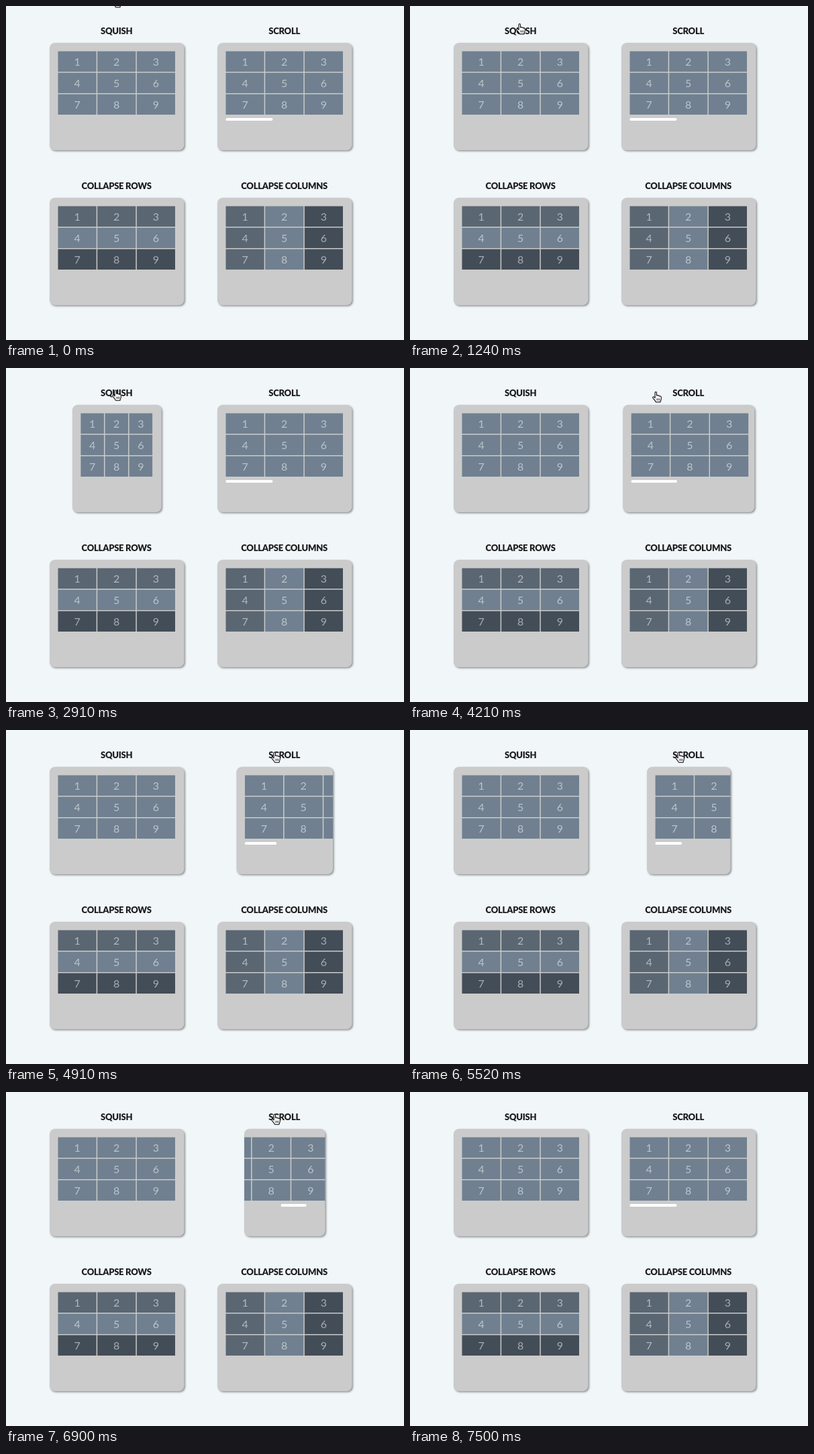
An HTML page with a canvas for the animation above (8 s loop, 593x498 px).

```html
<!DOCTYPE html>
<html lang="en">
<head>
<meta charset="utf-8">
<title>Responsive table patterns</title>
<style>
  html, body { margin: 0; width: 100%; height: 100%; overflow: hidden; background: #f1f6f9; }
  canvas { display: block; }
</style>
</head>
<body>
<canvas id="stage" width="593" height="498"></canvas>
<script>
const ctx = document.getElementById('stage').getContext('2d');
const LOOP = 8000, RESET = 7500;
const FULL = 200.5, SHRINK = 80, PAD = 12.5, INSET = 26, GAP = 1.5, ROW = 32;
const LEFT = 165.25, RIGHT = 415.25;
const SLATE = '#708090';
const SHADES = ['#5a6672', SLATE, '#434d57'];

const HAND = new Path2D(
  'M4.6 10V2.4C4.6.6 7 .6 7 2.4V6.6C7.3 5.6 9.3 5.7 9.4 7C9.8 6.2 11.5 6.4 11.6 7.7' +
  'C12.2 7 13.8 7.4 13.8 8.9V11.3C13.8 13 12.6 13.8 12.5 16.2H5.8' +
  'C5.6 14.4 3.2 12.3 1.6 10.4C.4 8.8 2 7.6 3.2 8.7Z');
const CREASES = new Path2D('M7.4 10.8V14M9.3 10.8V14M11.2 10.8V14');

const span = (t, from, to) => Math.min(1, Math.max(0, (t - from) / (to - from)));
const smooth = u => u * u * (3 - 2 * u);

// Cubic Bezier (.25, .1, .25, 1), the CSS "ease" curve
function ease(x) {
  let lo = 0, hi = 1;
  for (let i = 0; i < 24; i++) {
    const s = (lo + hi) / 2, r = 1 - s;
    if (0.75 * s * r * r + 0.75 * s * s * r + s * s * s < x) lo = s; else hi = s;
  }
  const s = (lo + hi) / 2, r = 1 - s;
  return 0.3 * s * r * r + 3 * s * s * r + s * s * s;
}

function label(text, x, y) {
  ctx.font = '900 13px Lato, "Open Sans", sans-serif';
  ctx.letterSpacing = '-0.25px';
  ctx.fillStyle = '#1c1d1f';
  ctx.fillText(text, x, y);
  ctx.letterSpacing = '0px';
}

function panel(cx, y, w) {
  const x = cx - w / 2;
  ctx.beginPath();
  ctx.roundRect(x, y, w, 160, 8);
  ctx.save();
  ctx.shadowColor = 'rgba(0,0,0,.42)';
  ctx.shadowOffsetX = 1.5;
  ctx.shadowOffsetY = 1.5;
  ctx.shadowBlur = 3;
  ctx.fillStyle = '#cbcbcb';
  ctx.fill();
  ctx.restore();
  return x;
}

function table(x, y, w, shade) {
  const cell = (w - 2 * GAP) / 3;
  ctx.font = '400 16px Lato, "Open Sans", sans-serif';
  for (let i = 0; i < 9; i++) {
    const col = i % 3, row = (i - col) / 3;
    const cx = x + col * (cell + GAP), cy = y + row * ROW;
    ctx.fillStyle = shade(row, col);
    ctx.fillRect(cx, cy, cell, ROW - GAP);
    ctx.fillStyle = 'rgba(255,255,255,.53)';
    ctx.fillText(i + 1, cx + cell / 2, cy + 21.2);
  }
}

function card(title, cx, y, w, shade) {
  label(title, cx - 0.6, y - 13.4);
  const x = panel(cx, y, w);
  table(x + PAD, y + PAD, w - INSET, shade);
}

function scrollCard(cx, y, w, q) {
  label('SCROLL', cx - 0.6, y - 13.4);
  const x = panel(cx, y, w);
  ctx.save();
  ctx.beginPath();
  ctx.rect(x, y, w, 160);
  ctx.clip();
  table(x + PAD - 80 * q, y + PAD, FULL - INSET, () => SLATE);
  const track = w - INSET;
  ctx.fillStyle = '#fff';
  ctx.beginPath();
  ctx.roundRect(x + PAD + track * 0.6 * q, y + 112, track * 0.4, 4, 1.5);
  ctx.fill();
  ctx.restore();
}

function pointer(t) {
  if (t >= RESET) return;
  const across = smooth(span(t, 3480, 4440));
  const x = 157.5 + 237 * across;
  const y = -14.5 + 46.5 * smooth(span(t, 340, 880))
    - 6.5 * span(t, 1110, 1240) + 6.5 * span(t, 1750, 1860)
    + 3.5 * Math.sin(Math.PI * across ** 2);
  ctx.save();
  ctx.translate(x, y);
  ctx.lineJoin = 'round';
  ctx.shadowColor = 'rgba(0,0,0,.3)';
  ctx.shadowOffsetY = 0.7;
  ctx.shadowBlur = 1.5;
  ctx.fillStyle = '#fff';
  ctx.fill(HAND);
  ctx.shadowColor = 'transparent';
  ctx.strokeStyle = '#111';
  ctx.lineWidth = 1.1;
  ctx.stroke(HAND);
  ctx.lineWidth = 0.8;
  ctx.stroke(CREASES);
  ctx.restore();
}

function draw(t) {
  ctx.fillStyle = '#f1f6f9';
  ctx.fillRect(0, 0, 593, 498);
  ctx.textAlign = 'center';

  const squish = t < 3880 ? ease(span(t, 1812, 3812)) : 0;
  const narrow = t < RESET ? ease(span(t, 4070, 6070)) : 0;
  const slide = t < RESET ? ease(span(t, 6050, 7950)) : 0;

  card('SQUISH', LEFT, 55, FULL - SHRINK * squish, () => SLATE);
  scrollCard(RIGHT, 55, FULL - SHRINK * narrow, slide);
  card('COLLAPSE ROWS', LEFT, 286, FULL, row => SHADES[row]);
  card('COLLAPSE COLUMNS', RIGHT, 286, FULL, (row, col) => SHADES[col]);
  pointer(t);
}

const start = performance.now();
function tick() {
  draw((performance.now() - start) % LOOP);
  requestAnimationFrame(tick);
}
tick();
</script>
</body>
</html>
```
